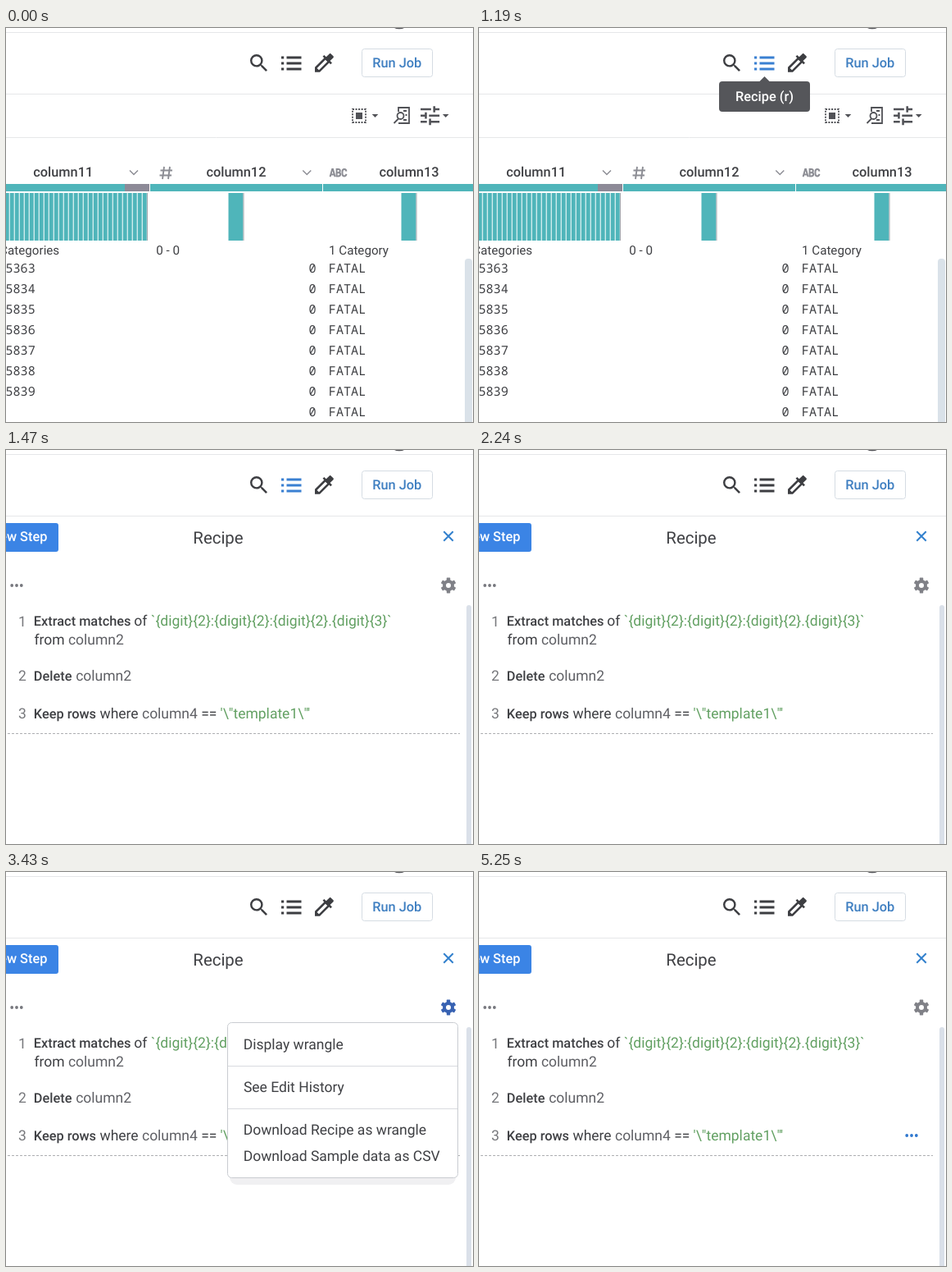
An HTML page that plays this animation: 570 by 480 pixels, repeating every 6.02 s.

```html
<!DOCTYPE html>
<html lang="en">
<head>
<meta charset="utf-8">
<title>Recipe panel</title>
<style>
  html, body { margin: 0; width: 100%; height: 100%; overflow: hidden; background: #fff; }
  svg { display: block; width: 570px; height: 480px; }
  text { font: 17.5px Roboto, Arial, sans-serif; fill: #3f4044; text-rendering: geometricPrecision; white-space: pre; }
  .med { font-size: 16.35px; font-weight: 500; }
  .label { font-size: 15.16px; }
  .mono { font: 15.16px "Noto Sans Mono", "DejaVu Sans Mono", monospace; }
  .title { font-size: 20.4px; }
  .mid { text-anchor: middle; }
  .end { text-anchor: end; }
  .num { fill: #77787c; }
  .col { fill: #5f6065; }
  .str { fill: #62a062; }
  .white { fill: #fff; }
  .link { fill: #3f7fc1; }
  .icon { fill: currentColor; color: #3d3e42; }
  .line { fill: none; stroke: currentColor; }
  .tool { color: #515257; }
  .grey { color: #8c8d94; }
  .rule { stroke: #e6e7e9; }

  /* All parts share one 6020 ms loop and change abruptly. */
  .list, .listTip, .grid, .panel, .gear, .gearTip, .menu, .dots { animation: 6020ms step-end infinite; }
  .list { animation-name: list; }
  .listTip { animation-name: listTip; }
  .grid { animation-name: grid; }
  .panel { animation-name: panel; }
  .gear { animation-name: gear; }
  .gearTip { animation-name: gearTip; }
  .menu { animation-name: menu; }
  .dots { animation-name: dots; }
  @keyframes list { 0%, 37.209% { color: #3d3e42; } 9.302% { color: #3a80d2; } }
  @keyframes listTip { 0%, 23.256% { opacity: 0; } 9.302% { opacity: 1; } }
  @keyframes grid { 0% { opacity: 1; } 20.93%, 100% { opacity: 0; } }
  @keyframes panel { 0% { opacity: 0; } 20.93%, 100% { opacity: 1; } }
  @keyframes gear { 0%, 83.721% { color: #808187; } 47.674% { color: #3862b2; } }
  @keyframes gearTip { 0%, 55.814% { opacity: 0; } 47.674% { opacity: 1; } }
  @keyframes menu { 0%, 86.047% { opacity: 0; } 55.814% { opacity: 1; } }
  @keyframes dots { 0% { opacity: 0; } 86.047%, 100% { opacity: 1; } }
</style>
</head>
<body>
<svg viewBox="0 0 570 480">
  <defs>
    <pattern id="stripes" width="6" height="58" patternUnits="userSpaceOnUse">
      <rect width="6" height="58" fill="#4fb5ba"/>
      <rect x="3.6" width="1.4" height="58" fill="#cdebec"/>
    </pattern>
    <path id="chevron" class="line" d="M-5-2.6 0 2.6 5-2.6" stroke-width="1.4"/>
    <path id="caret" d="M-3.8-1.9h7.6L0 1.9z"/>
    <g id="ellipsis">
      <circle cx="-5.8" r="1.9"/><circle r="1.9"/><circle cx="5.8" r="1.9"/>
    </g>
    <rect id="tooth" x="-2.2" y="-9.4" width="4.4" height="4" rx=".6"/>
    <g id="bar">
      <rect width="18" height="58" fill="#4fb5ba"/>
      <rect x="18" width="1" height="58" fill="#a5a7ad"/>
    </g>
  </defs>

  <!-- Top bar -->
  <path class="rule" d="M0 5.5h570" stroke="#dcdcde"/>
  <path d="M474 0h12q-2 1.2-6 1.2T474 0" fill="#55565a"/>
  <path class="rule" d="M0 80.5h570"/>
  <path class="icon" transform="translate(294.4 28.4) scale(1.2)" fill-rule="evenodd" d="M15.5 14h-.79l-.28-.27A6.47 6.47 0 0 0 16 9.5 6.5 6.5 0 1 0 9.5 16c1.61 0 3.09-.59 4.23-1.57l.27.28v.79l5 4.99L20.49 19zM9.5 14a4.5 4.5 0 1 1 0-9 4.5 4.5 0 0 1 0 9z"/>
  <g class="icon list">
    <path class="line" stroke-width="2.8" d="M336 36h3.2M342.5 36h18M336 43h3.2M342.5 43h18M336 50h3.2M342.5 50h18"/>
  </g>
  <path class="icon" transform="translate(373.2 27.2) scale(1.27)" fill-rule="evenodd" d="M20.71 5.63l-2.34-2.34c-.39-.39-1.02-.39-1.41 0l-3.12 3.12-1.93-1.91-1.41 1.41 1.42 1.42L3 16.25V21h4.75l8.92-8.92 1.42 1.42 1.41-1.41-1.92-1.92 3.12-3.12c.4-.4.4-1.03.01-1.42zM6.92 19L5 17.08l8.06-8.06 1.92 1.92z"/>
  <rect x="434.5" y="25.5" width="86" height="34" rx="3" fill="#fff" stroke="#d5dce3"/>
  <text class="med mid link" x="477.3" y="48">Run Job</text>

  <!-- Data grid -->
  <g class="grid">
    <path class="rule" d="M0 133.5h570"/>
    <g class="icon tool">
      <rect class="line" x="423" y="99" width="16" height="16" stroke-width="1.8" stroke-dasharray="2 1.55"/>
      <rect x="427" y="103" width="8" height="8"/>
      <use href="#caret" x="450.5" y="107"/>
      <path class="line" stroke-width="1.8" d="M479 102v-5h13v19h-13M485 101h4M487.5 106h2M485 112h4M479 110.5l-5.5 5.5"/>
      <circle class="line" cx="481.5" cy="107" r="4" stroke-width="1.8"/>
      <path transform="translate(502.2 91.3) scale(1.28)" d="M3 17v2h6v-2zM3 5v2h10V5zm10 16v-2h8v-2h-8v-2h-2v6zM7 9v2H3v2h4v2h2V9zm14 4v-2H11v2zm-6-4h2V7h4V5h-4V3h-2z"/>
      <use href="#caret" x="536.7" y="107"/>
    </g>

    <text class="med" x="33.2" y="181">column11</text>
    <text class="med" x="244.4" y="181">column12</text>
    <text class="med" x="455.5" y="181">column13</text>
    <g class="icon grey">
      <use href="#chevron" x="156" y="176"/>
      <use href="#chevron" x="367.3" y="176"/>
      <path class="line" stroke-width="1.9" d="M193 169l-2 15M200 169l-2 15M188.5 173.5h14.5M187.5 179.5h14.5"/>
      <path class="line" stroke-width="2" d="M395.6 181.3l2.6-9.3h.8l2.6 9.3M396.5 178.5h4.2M403.6 172v8.4h2.2q2.4 0 2.4-2.1t-2.4-2.1h-2.2 2q2.2 0 2.2-2.1t-2.2-2.1zM415.4 174.6q-.3-2.6-2.4-2.6-2.5 0-2.5 3v2.5q0 3 2.5 3 2.1 0 2.4-2.6"/>
    </g>

    <path fill="#4fb5ba" d="M0 190h145v9H0zM176 190h210v9H176zM387 190h183v9H387z"/>
    <rect x="145" y="190" width="30" height="9" fill="#8d8a97"/>
    <rect y="201" width="172" height="58" fill="url(#stripes)"/>
    <rect x="172" y="201" width="1" height="58" fill="#a5a7ad"/>
    <use href="#bar" x="271.5" y="201"/>
    <use href="#bar" x="482.5" y="201"/>

    <text class="label end" x="65.2" y="276">Categories</text>
    <text class="label" x="183.3" y="276">0 - 0</text>
    <text class="label" x="394" y="276">1 Category</text>
    <g id="rows"></g>
    <rect x="560" y="281" width="9" height="210" rx="4" fill="#dae2e9"/>
  </g>

  <!-- Recipe panel -->
  <g class="panel">
    <rect x="-30" y="89" width="94" height="35" rx="3" fill="#3b84e5"/>
    <text class="med end white" x="50.4" y="111">New Step</text>
    <text class="title mid" x="259" y="114">Recipe</text>
    <path d="M534.3 99.3l11.4 11.4M545.7 99.3l-11.4 11.4" stroke="#3280cd" stroke-width="2"/>
    <use href="#ellipsis" x="13" y="165" fill="#77787e"/>
    <g class="icon gear" transform="translate(540 165)">
      <circle class="line" r="5" stroke-width="4"/>
      <g id="teeth"></g>
    </g>

    <text class="num" x="15" y="214.5">1</text>
    <text class="med" x="33.8" y="214.3">Extract matches</text>
    <text x="156.3" y="214.3">of</text>
    <text class="str" x="177" y="214.3">`{digit}{2}:{digit}{2}:{digit}{2}.{digit}{3}`</text>
    <text x="34.4" y="237">from <tspan class="col">column2</tspan></text>

    <text class="num" x="15" y="281.3">2</text>
    <text class="med" x="33.8" y="281.3">Delete</text>
    <text class="col" x="85.2" y="281.3">column2</text>

    <text class="num" x="15" y="327.3">3</text>
    <text class="med" x="33.8" y="327.3">Keep rows</text>
    <text x="114.5" y="327.3">where <tspan class="col">column4</tspan> ==</text>
    <text class="str" x="261.6" y="327.3">'\"template1\"'</text>

    <path d="M2 345.5h552" stroke="#aeafb2" stroke-dasharray="3 2"/>
    <rect x="562" y="189" width="6" height="300" rx="3" fill="#dae0e9"/>
    <use class="dots" href="#ellipsis" x="528" y="321" fill="#2f78cf"/>
  </g>

  <g class="listTip">
    <path d="M341.5 66l7-7 7 7z" fill="#55565a"/>
    <rect x="293" y="65" width="111" height="37" rx="4" fill="#55565a"/>
    <text class="med mid white" x="348.5" y="89">Recipe (r)</text>
  </g>

  <g class="gearTip">
    <path d="M533 145l7 7 7-7z" fill="#55565a"/>
    <rect x="416" y="109" width="148" height="37" rx="4" fill="#55565a"/>
    <text class="med mid white" x="490" y="132.3">Recipe options</text>
  </g>

  <g class="menu">
    <rect x="273" y="340" width="276" height="41" rx="9" fill="#f0f0f2"/>
    <rect x="270.5" y="183.5" width="281" height="189" rx="5" fill="#fff" stroke="#c9ccd1"/>
    <path d="M271 236.5h280M271 288.5h280" stroke="#d9dbdf"/>
    <text x="289.7" y="216">Display wrangle</text>
    <text x="289.9" y="268">See Edit History</text>
    <text x="289.7" y="320">Download Recipe as wrangle</text>
    <text x="289.7" y="352">Download Sample data as CSV</text>
  </g>
</svg>
<script>
  const cell = (x, y, value) => `<text class="mono" x="${x}" y="${y}">${value}</text>`;
  const ids = [5363, 5834, 5835, 5836, 5837, 5838, 5839, ""];
  document.getElementById("rows").innerHTML = ids.map((id, i) => {
    const y = 298.3 + 25 * i;
    return cell(-0.6, y, id) + cell(369.5, y, 0) + cell(393.8, y, "FATAL");
  }).join("");

  document.getElementById("teeth").innerHTML = [0, 60, 120, 180, 240, 300]
    .map(angle => `<use href="#tooth" transform="rotate(${angle})"/>`).join("");
</script>
</body>
</html>
```
